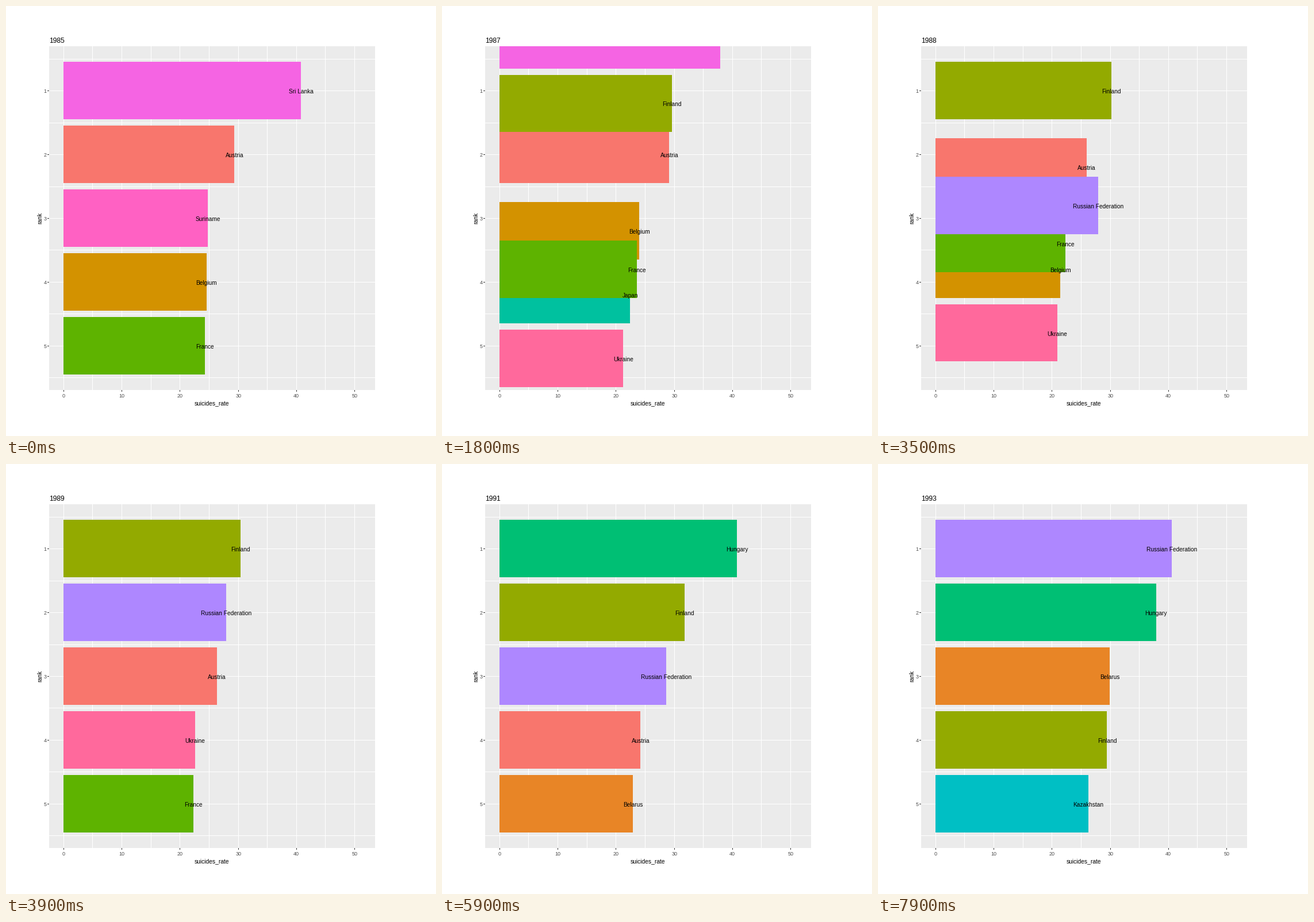
Animation of 748x748 px, one loop 8 s. Source, as a matplotlib script:

```python
import matplotlib.pyplot as plt
from matplotlib.animation import FuncAnimation
from matplotlib.patches import Rectangle

SIZE, DPI = 748, 100
PX = 72 / DPI
X0, X_UNIT = 99.8, 10.125      # value axis, in pixels
Y0, Y_UNIT = 147.3, 110.85     # centre of rank 1 and rank spacing
STEPS, HOLD = 10, 4            # frames per year, frames before the move starts
FIRST_YEAR = 1985

COLORS = {
    "Austria": "#F8766D", "Belarus": "#E88526", "Belgium": "#D39200",
    "Finland": "#93AA00", "France": "#5EB300", "Hungary": "#00BF74",
    "Japan": "#00C19F", "Kazakhstan": "#00BFC4",
    "Russian Federation": "#AE87FF", "Sri Lanka": "#F564E3",
    "Suriname": "#FF61C3", "Ukraine": "#FF699C",
}

# Top five per year, best rank first
YEARS = [
    {"Sri Lanka": 40.84, "Austria": 29.4, "Suriname": 24.8,
     "Belgium": 24.6, "France": 24.35},
    {"Sri Lanka": 37.9, "Austria": 30.0, "France": 24.5,
     "Belgium": 23.9, "Japan": 22.45},
    {"Finland": 29.6, "Austria": 29.0, "Belgium": 24.1,
     "France": 23.4, "Ukraine": 21.3},
    {"Finland": 30.2, "Austria": 25.9, "France": 22.3,
     "Belgium": 21.45, "Ukraine": 20.55},
    {"Finland": 30.4, "Russian Federation": 28.0, "Austria": 26.4,
     "Ukraine": 22.6, "France": 22.3},
    {"Finland": 32.35, "Russian Federation": 28.65, "Austria": 25.25,
     "Ukraine": 22.22, "Belarus": 22.2},
    {"Hungary": 40.84, "Finland": 31.8, "Russian Federation": 28.65,
     "Austria": 24.25, "Belarus": 22.95},
    {"Hungary": 40.95, "Russian Federation": 33.25, "Finland": 30.75,
     "Belarus": 25.3, "Ukraine": 24.05},
    {"Russian Federation": 40.6, "Hungary": 37.9, "Belarus": 29.95,
     "Finland": 29.5, "Kazakhstan": 26.25},
]

plt.rcParams["font.family"] = ["Liberation Sans", "DejaVu Sans"]
fig = plt.figure(figsize=(SIZE / DPI, SIZE / DPI), dpi=DPI, facecolor="white")
ax = fig.add_axes([0, 0, 1, 1])
ax.set(xlim=(0, SIZE), ylim=(SIZE, 0))
ax.axis("off")


def rect(x, y, w, h, color, z):
    patch = Rectangle((x, y), w, h, fc=color, lw=0, aa=False, zorder=z)
    return ax.add_patch(patch)


def text(x, y, s, px, color="black", **kw):
    return ax.text(x, y, s, fontsize=px * PX, color=color, zorder=30, **kw)


def x_of(value):
    return X0 + X_UNIT * value


def y_of(rank):
    return Y0 + Y_UNIT * (rank - 1)


panel = rect(75, 70, 567, 598, "#EBEBEB", 0)

for v in range(0, 55, 5):
    x = round(x_of(v))
    rect(x, 70, 1, 598, "white", 1)
    if v % 10 == 0:
        rect(x, 668, 1, 3, "#333333", 1)
        text(x + 0.3, 681, str(v), 9, "#4D4D4D", ha="center")

for half in range(1, 12):
    y = round(y_of(half / 2))
    rect(75, y, 567, 1, "white", 1)
    if half % 2 == 0:
        rect(72, y, 3, 1, "#333333", 1)
        text(70.5, y + 4, str(half // 2), 9, "#4D4D4D", ha="right")

text(358, 694, "suicides_rate", 10.3, ha="center")
text(59, 369, "rank", 10.3, rotation=90, ha="center", va="center")
title = text(75, 63.5, "", 12)

bars, labels = {}, {}
for name, color in COLORS.items():
    bars[name] = rect(X0, 0, 0, 0, color, 5)
    labels[name] = text(0, 0, name, 10.1, ha="center", clip_on=True)
    bars[name].set_clip_path(panel)
    labels[name].set_clip_path(panel)


def ranked(year):
    return {n: (r, v) for r, (n, v) in enumerate(year.items(), 1)}


def poses(old, new, p):
    """Bars in drawing order as (name, rank, value)."""
    a, b = ranked(old), ranked(new)
    out = []
    for name in reversed(list(a)):
        r, v = a[name]
        if name in b:
            r2, v2 = b[name]
            out.append((name, r + (r2 - r) * p, v + (v2 - v) * p))
        elif p < 1:
            out.append((name, r - p, v))          # leaves one rank upward
    if p > 0:
        for name in reversed(list(b)):
            if name not in a:
                r, v = b[name]
                out.append((name, r + 1 - p, v))  # arrives from one rank below
    return out


def draw(i):
    k, step = divmod(i, STEPS)
    p = max(0, step - HOLD) / (STEPS - 1 - HOLD)
    title.set_text(str(FIRST_YEAR + k + (p > 0.5)))
    for name in COLORS:
        bars[name].set_visible(False)
        labels[name].set_visible(False)
    for z, (name, rank, value) in enumerate(poses(YEARS[k], YEARS[k + 1], p)):
        top, bottom = round(y_of(rank - 0.45)), round(y_of(rank + 0.45))
        bar, label = bars[name], labels[name]
        bar.set_bounds(round(X0), top, round(x_of(value)) - round(X0), bottom - top)
        bar.set(visible=True, zorder=5 + z)
        label.set(visible=True, position=(x_of(value), y_of(rank) + 5))
    return [title, *bars.values(), *labels.values()]


anim = FuncAnimation(fig, draw, frames=STEPS * (len(YEARS) - 1), interval=100,
                     repeat=True, repeat_delay=0, blit=False)
plt.show()
```
